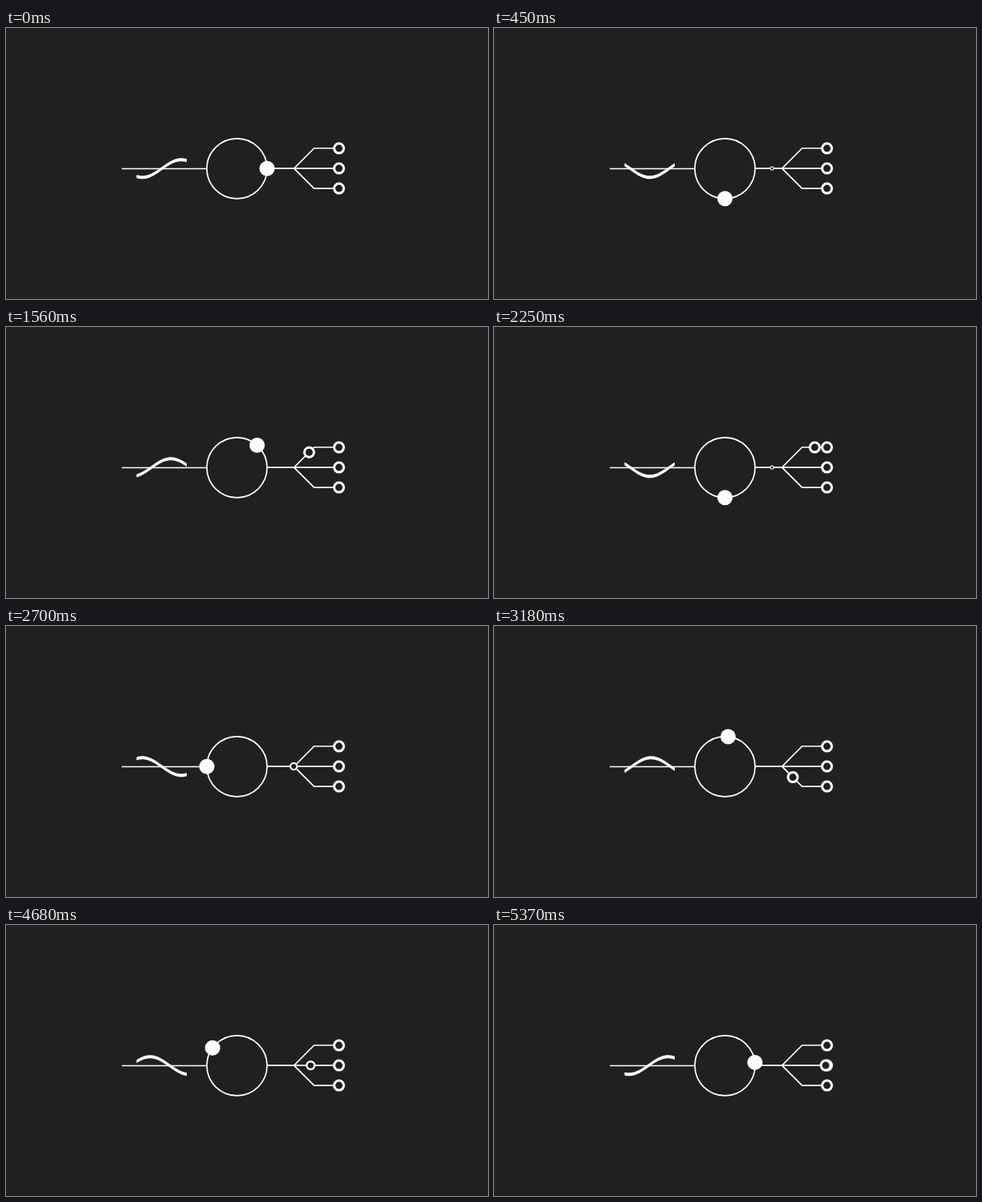
An HTML page for the animation above (5400 ms loop, 600 by 338 pixels).

```html
<!DOCTYPE html>
<html lang="en">
<head>
<meta charset="utf-8">
<title>Signal flow</title>
<style>
  html, body { margin: 0; width: 100%; height: 100%; overflow: hidden; background: #202020; }
  svg { display: block; width: 100vw; height: 100vh; }
  .line { fill: none; stroke: #fff; stroke-width: 1.7; }
  .ring { fill: #202020; stroke: #fff; stroke-width: 3; }
  .solid { fill: #fff; }
</style>
</head>
<body>
<svg viewBox="0 0 600 338">
  <path class="line" d="M144 175.5H250M325 175.2H408M408 150H383.5L358.5 175.2L383.5 200.2H408"/>
  <circle class="line" cx="287.5" cy="175.3" r="37.5"/>
  <path id="wave" class="solid"/>
  <g id="rings"></g>
  <circle id="dot" class="solid" r="9.5"/>
</svg>
<script>
const LOOP = 5400, TURN = 1800, STEP = 30;
const MID = 175.3, SPLIT = 358.5, BEND = 25;
const START = 334.5, END = 414.5, GROW = 1320;

// Each pulse takes one branch: -1 up, 1 down, 0 straight.
const pulses = [
  { start: 0, duration: 2700, branch: -1 },
  { start: 1800, duration: 2700, branch: 1 },
  { start: 3600, duration: 1800, branch: 0 }
];

const wave = document.getElementById('wave');
const dot = document.getElementById('dot');
const rings = document.getElementById('rings');

function addRing() {
  const ring = document.createElementNS('http://www.w3.org/2000/svg', 'circle');
  ring.setAttribute('class', 'ring');
  ring.setAttribute('r', 6);
  rings.appendChild(ring);
  return ring;
}

function place(ring, x, y, scale = 1) {
  ring.setAttribute('transform', `translate(${x} ${y}) scale(${scale})`);
}

for (const branch of [-1, 0, 1]) place(addRing(), END, 175.1 + branch * BEND);
for (const pulse of pulses) pulse.ring = addRing();

function wavePath(angle) {
  const left = 162.5, right = 225, center = 193.9, length = 97, half = 2;
  const top = [], bottom = [];
  for (let i = 0; i <= 50; i++) {
    const x = left + (right - left) * i / 50;
    const y = MID - 11 * Math.sin((x - center) / length * 2 * Math.PI - angle);
    top.push(`${x} ${y - half}`);
    bottom.unshift(`${x} ${y + half}`);
  }
  return `M${top.concat(bottom).join('L')}Z`;
}

function drawPulse({ ring, start, duration, branch }, time) {
  const age = time - start;
  const visible = age > 0 && age < duration;
  ring.style.display = visible ? '' : 'none';
  if (!visible) return;
  const p = age / duration;
  const x = START + (END - START) * (0.83 * p + 0.17 * p * p);
  const y = 175.1 + branch * Math.min(BEND, Math.max(0, x - SPLIT));
  place(ring, x, y, Math.min(1, age / GROW));
}

function draw(time) {
  const angle = time / TURN * 2 * Math.PI;
  dot.setAttribute('cx', 287.5 + 37.5 * Math.cos(angle));
  dot.setAttribute('cy', MID + 37.5 * Math.sin(angle));
  wave.setAttribute('d', wavePath(angle));
  for (const pulse of pulses) drawPulse(pulse, time);
}

let origin;
function tick(now) {
  origin ??= now;
  draw(Math.floor((now - origin) % LOOP / STEP) * STEP);
  requestAnimationFrame(tick);
}
draw(0);
requestAnimationFrame(tick);
</script>
</body>
</html>
```
